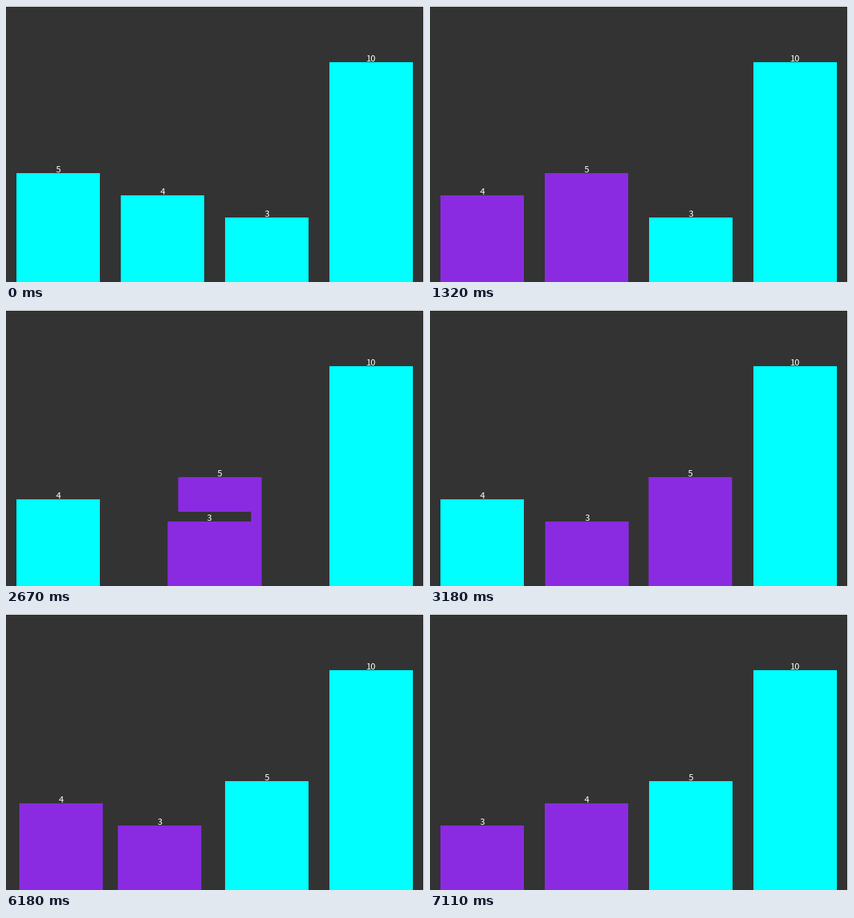
Write a matplotlib script that moves like this. It is 601x398 px and loops after 8000 ms.

```python
import numpy as np
import matplotlib.pyplot as plt
from matplotlib.animation import FuncAnimation
from matplotlib.patches import Rectangle

W, H, DPI = 601, 398, 64
LOOP, INTERVAL, TICK = 8000, 20, 30
DARK, IDLE, ACTIVE = "#333333", "#00ffff", "#8a2be2"
VALUES = [5, 4, 3, 10]
SLOT, BAR_W, UNIT, FLOOR, LABEL_H = 150, 120, 32, 401, 14

# Comparisons: start in ms, left slot, whether the pair swaps, lead in ticks
COMPARISONS = [
    (390, 0, True, -0.5),
    (2310, 1, True, -0.5),
    (4230, 2, False, 0),
    (6180, 0, True, 0.5),
]


def ease_out(x):
    """Cubic Bezier (0, 0, 0.58, 1)."""
    s = np.linspace(0, 1, 1001)
    return np.interp(x, 1.74 * s**2 * (1 - s) + s**3, 3 * s**2 - 2 * s**3)


class Bar:
    def __init__(self, ax, value):
        self.top = FLOOR - UNIT * value
        self.body = Rectangle((0, self.top), BAR_W, UNIT * value, lw=0, snap=False)
        self.strip = Rectangle((0, self.top - LABEL_H), BAR_W, LABEL_H,
                               lw=0, fc=DARK, snap=False)
        ax.add_patch(self.body)
        ax.add_patch(self.strip)
        self.label = ax.text(0, self.top - 1, str(value), color="white",
                             family="Noto Sans CJK JP", size=12.7 * 72 / DPI,
                             ha="center", va="baseline")

    def place(self, x, color, layer):
        self.body.set_x(x)
        self.strip.set_x(x)
        self.label.set_x(x + BAR_W / 2)
        self.body.set_facecolor(color)
        for part, lift in ((self.strip, 0), (self.body, 0.1), (self.label, 0.2)):
            part.set_zorder(layer + lift)


fig = plt.figure(figsize=(W / DPI, H / DPI), dpi=DPI, facecolor="white")
ax = fig.add_axes([0, 0, 1, 1])
ax.set(xlim=(0, W), ylim=(H, 0))
ax.axis("off")
ax.add_patch(Rectangle((0, 1), 600, H, lw=0, fc=DARK, snap=False, zorder=0))
bars = [Bar(ax, value) for value in VALUES]


def draw(frame):
    time = (frame + 0.5) * INTERVAL
    order = list(range(len(bars)))
    pair, shift = (), 0
    for start, slot, swaps, lead in COMPARISONS:
        if time < start:
            break
        if shift:
            a, b = previous, previous + 1
            order[a], order[b] = order[b], order[a]
        pair, previous = (slot, slot + 1), slot
        ticks = (time - start) // TICK + lead
        shift = SLOT * ease_out(np.clip(ticks / 30, 0, 1)) if swaps else 0

    for slot, index in enumerate(order):
        x = 15 + SLOT * slot
        color, layer = IDLE, 1
        if slot in pair:
            color = ACTIVE
            if slot == pair[0]:
                x += shift
            else:
                x -= shift
                layer = 2
        bars[index].place(x, color, layer)
    return []


anim = FuncAnimation(fig, draw, frames=LOOP // INTERVAL, interval=INTERVAL,
                     repeat=True, repeat_delay=0, blit=False)
plt.show()
```
